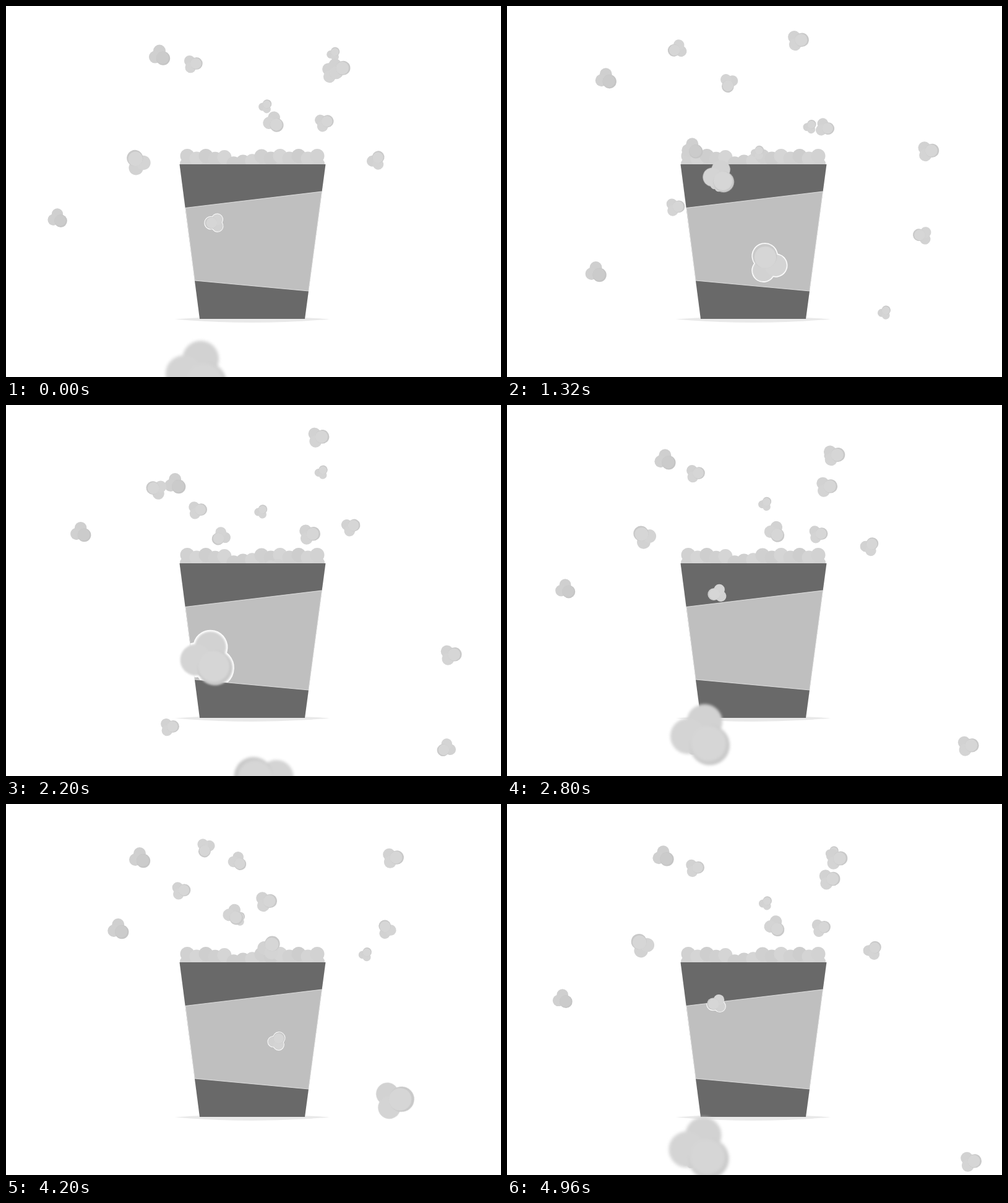
An HTML page that plays this animation: 800 by 600 pixels, repeating every 5000 ms.

```html
<!DOCTYPE html>
<html lang="en">
<head>
<meta charset="utf-8">
<title>Popcorn</title>
<style>
html, body { margin: 0; width: 100%; height: 100%; overflow: hidden; background: #fff; }
svg { display: block; width: 100vw; height: 100vh; }
</style>
</head>
<body>
<svg viewBox="0 0 800 600">
  <defs id="defs">
    <path id="label" d="M290 326.500L510.500 300L489 461L305 444Z"/>
    <clipPath id="band"><use href="#label"/></clipPath>
  </defs>
  <path fill="#e9e9e9" d="M273 506.500Q335 502 398 502Q460 502 523 506.500Q460 512 398 512Q335 512 273 506.500Z"/>
  <g id="pile"></g>
  <g id="back"></g>
  <path fill="#696969" d="M280.500 256H516.500L483 506H313Z"/>
  <use href="#label" fill="#bfbfbf" stroke="#eee" stroke-width=".8"/>
  <g id="halo" clip-path="url(#band)"></g>
  <g id="front"></g>
</svg>
<script>
const NS = 'http://www.w3.org/2000/svg';
const $ = id => document.getElementById(id);

function add(parent, tag, attrs) {
  const el = document.createElementNS(NS, tag);
  for (const k in attrs) el.setAttribute(k, attrs[k]);
  return parent.appendChild(el);
}
const dot = (parent, cx, cy, r, fill) => add(parent, 'circle', { cx, cy, r, fill });
const grey = v => `rgb(${v},${v},${v})`;

// Popcorn at rest: a flat row behind a bumpy one that sags left of the middle
for (let x = 290; x < 512; x += 12) dot($('pile'), x, 255, 9, grey(210));
for (let i = 0; i < 15; i++) {
  const x = 293 + 15 * i, even = i % 2 === 0;
  const sag = 10 * Math.exp(-(((x - 378) / 20) ** 2));
  dot($('pile'), x, 245 + sag + (even ? -2.5 : 2), 11.5, grey(209 + Math.round(4 * Math.sin(i * 2))));
}

// One popcorn, 34 wide: three puffs, the biggest with a shaded rim
function clump(parent, [a, b, rim, face]) {
  const g = add(parent, 'g', {});
  dot(g, 0, -7, 10, a);
  dot(g, -7, 3, 10, b);
  dot(g, 6, 5, 11.2, rim);
  dot(g, 5, 4.2, 10, face);
  return g;
}

const CYCLE = 35, RISE = 19, FALL = 0.8, SPIN = 6.6;
const LIGHT = [210, 212, 201, 214].map(grey);
const DARK = [207, 208, 197, 203].map(grey);
const WHITE = Array(4).fill('#fff');
const kernels = [];

// Every flight is the same parabola: peak phase, top point, sideways drift.
// grow: change of width while falling, over "span"; roll: turning direction
function toss(peak, x, y, vx, style) {
  const k = { peak, x, y, vx, size: 30, grow: 0, span: 48, turn: 0, roll: 0, ...style };
  const tones = k.dark ? DARK : LIGHT;
  k.up = clump($('back'), tones);
  k.down = clump($('front'), tones);
  k.halo = clump($('halo'), WHITE);
  k.halo.setAttribute('stroke', '#fff');
  for (const c of k.halo.children) c.setAttribute('vector-effect', 'non-scaling-stroke');
  if (k.grow > 50) {
    const id = 'soft' + kernels.length;
    const f = add($('defs'), 'filter', { id, x: '-20%', y: '-20%', width: '140%', height: '140%' });
    k.blur = add(f, 'feGaussianBlur', { stdDeviation: 0 });
    k.soft = `url(#${id})`;
  }
  kernels.push(k);
}

const toasted = { size: 34, dark: true };
const tilted = { size: 34, turn: -43 };
const tiny = { size: 22, turn: -95 };
const rolling = (roll, turn, more) => ({ roll, turn, ...more });

toss(2.4, 237.3, 75, -4.45, toasted);
toss(17, 202.7, 83.8, -6.65, { ...toasted, grow: -13 });
toss(5.57, 293.8, 68.5, -1.29, { ...tilted, size: 30 });
toss(8.35, 580.5, 51.5, 6.53, tilted);
toss(26.77, 488.3, 46.5, 5.89, { ...tilted, grow: 62 });
toss(16.9, 370.6, 89, -1.8, rolling(1, 23));
toss(11.6, 390.6, 176.8, -4.29, tiny);
toss(6.85, 559.6, 150.5, 6.8, rolling(-1, -100));
toss(26.3, 533.6, 189.5, 7.4, rolling(-1, -40));
toss(0.6, 531.2, 77.6, 3.44, tiny);
toss(33.28, 417, 160.2, 1.23, { ...tiny, grow: 38 });
toss(19.25, 299.6, 55.5, -5.5, rolling(1, 96, { grow: 70 }));
toss(5.6, 429.6, 162, -0.48, rolling(-1, -30, { size: 33.5, grow: 128 }));
toss(12.1, 376, 171.5, -2.9, { size: 33, turn: 14, grow: 69, span: 28 });

const ease = p => p < 0.5 ? 4 * p ** 3 : 1 - 4 * Math.max(0, 1 - p) ** 3;

function place(el, k, t, size) {
  const x = k.x + k.vx * t, y = k.y + FALL * t * t;
  const angle = k.turn + k.roll * SPIN * t;
  el.setAttribute('transform',
    `translate(${x.toFixed(2)} ${y.toFixed(2)}) rotate(${angle.toFixed(2)}) scale(${(size / 34).toFixed(4)})`);
}

// Full speed, then slow motion between 0.8 s and 3.8 s, then full speed
function phase(ms) {
  const n = ms / 40;
  if (n < 20) return n;
  return n < 95 ? 20 + (n - 20) * 4 / 15 : n - 55;
}

function draw(ms) {
  const now = phase(ms);
  for (const k of kernels) {
    const t = ((now - k.peak) % CYCLE + CYCLE) % CYCLE;
    const size = k.size + k.grow * ease(t / k.span);
    const soft = Math.max(0, size - 45) * 0.045;
    place(k.down, k, t, size);
    place(k.halo, k, t, size);
    k.halo.setAttribute('stroke-width', 1.8 + soft * 2);
    if (k.blur) {
      k.blur.setAttribute('stdDeviation', soft * 34 / size);
      if (soft > 0) k.down.setAttribute('filter', k.soft);
      else k.down.removeAttribute('filter');
    }
    // The next toss climbs out of the bucket while this one falls
    const rising = t - CYCLE;
    k.up.setAttribute('display', rising > -RISE ? 'inline' : 'none');
    place(k.up, k, rising, k.size);
  }
}

const start = performance.now();
function tick() {
  const ms = (performance.now() - start) % 5000;
  draw(Math.floor(ms / 40) * 40);
  requestAnimationFrame(tick);
}
draw(0);
requestAnimationFrame(tick);
</script>
</body>
</html>
```
